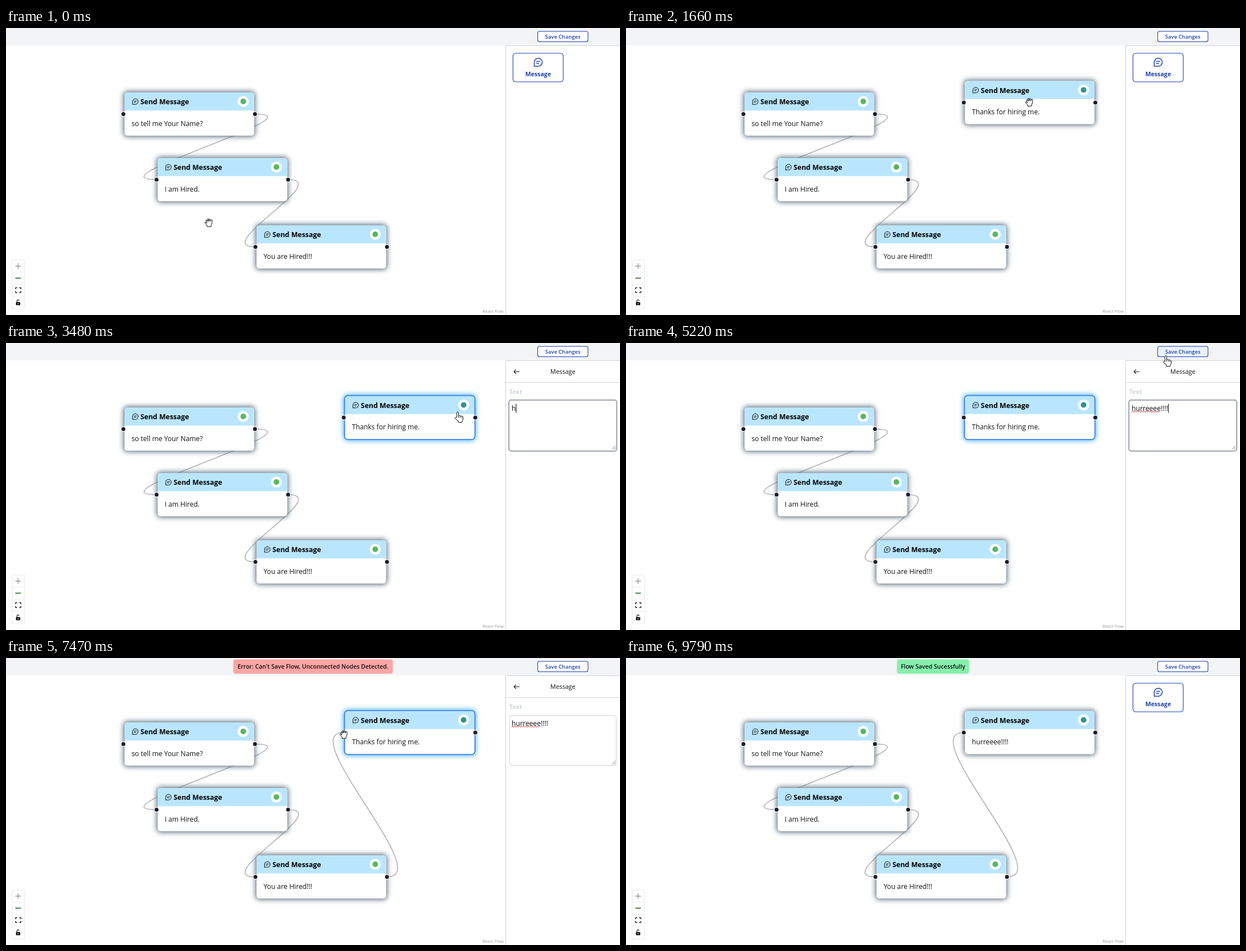
An HTML page for the animation above (9860 ms loop, 1093 by 512 pixels).

```html
<!DOCTYPE html>
<html lang="en">
<head>
<meta charset="utf-8">
<title>Message flow builder</title>
<style>
html, body { margin: 0; width: 100%; height: 100%; overflow: hidden; background: #fff; }
svg { display: block; width: 100%; height: 100%; font-family: "Open Sans", "Noto Sans", sans-serif; }
text { white-space: pre; }
.b { font-weight: 700; }
.s { font-weight: 600; }
.body { font-size: 12.2px; fill: #111; }
.edge { fill: none; stroke: #b1b1b7; stroke-width: 1.6; }
.glow { filter: blur(4.6px); }
.icon { fill: none; stroke: currentColor; stroke-width: 2; stroke-linecap: round; stroke-linejoin: round; }
.hand { fill: #fff; stroke: #111; stroke-width: 1; stroke-linejoin: round; }
</style>
</head>
<body>
<svg id="stage" viewBox="0 0 1093 512"></svg>
<script>
const LOOP = 9860;
const BLUE = '#1e40af';
const FIRST = 'Thanks for hiring me.';
const NEXT = 'hurreeee!!!!';

// Moments at which the interface changes
const T = {
  drag: 1060, drop: 1570, overNode: 1850, select: 2240,
  markFrom: 2790, markTo: 3290, type: 3430, keyGap: 108, spell: 4860,
  save: 5440, error: 5510, link: 6310, snap: 7160, linked: 7390,
  errorEnd: 7510, saveAgain: 8600
};
const PRESSES = [
  [T.drag, T.drop], [2180, 2310], [T.markFrom, T.markTo],
  [5390, 5520], [T.link, T.linked], [8480, 8630]
];

// Pointer path: time, x, y
const PATH = [
  [0, 361, 347], [110, 361, 347], [920, 947, 72], [1100, 947, 72],
  [1540, 718, 132], [1900, 718, 132], [2120, 728, 134], [2320, 728, 134],
  [2740, 1017, 117], [2830, 1017, 117], [3220, 804, 124], [4660, 804, 124],
  [5220, 961, 24], [5380, 984, 15], [5580, 984, 15], [6200, 679, 391],
  [6340, 679, 391], [6660, 711, 337], [7170, 588, 143], [7320, 600, 136],
  [7460, 601, 136], [8220, 988, 14], [8700, 988, 14], [9290, 353, 384],
  [9370, 352, 384], [9750, 212, 526], [LOOP, 212, 526]
];

const NODES = [
  [211, 115, 'so tell me Your Name?'],
  [270, 232, 'I am Hired.'],
  [446, 352, 'You are Hired!!!'],
  [603.3, 94.5, FIRST]
];

const text = (x, y, size, str, extra = '') =>
  `<text x="${x}" y="${y}" font-size="${size}" ${extra}>${str}</text>`;
const rect = (x, y, w, h, fill, extra = '') =>
  `<rect x="${x}" y="${y}" width="${w}" height="${h}" fill="${fill}" ${extra}/>`;
const line = (d, color, width = 1) =>
  `<path d="${d}" fill="none" stroke="${color}" stroke-width="${width}"/>`;
const chatIcon = (x, y, size, color) =>
  `<g class="icon" transform="translate(${x} ${y}) scale(${size / 24})" color="${color}">
    <path d="M2.5 21.5V12A9.5 9.5 0 1 1 12 21.5zM8 10h8M8 14.5h5"/></g>`;

function node([x, y, label], i) {
  const badge = i === 3 ? '#2f9490' : '#55b95c';
  const dot = cx => `<circle cx="${cx}" cy="38.5" r="4.1" fill="#1a192b" stroke="#fff" stroke-width="1.2"/>`;
  return `<g id="node${i}" transform="translate(${x} ${y})">
    ${rect(-2, -2, 234.5, 81, '#60717f', 'rx="7" class="glow"')}
    ${rect(0, 0, 230.7, 77, '#fff', 'rx="5.5"')}
    <path d="M0 32.2V5.5A5.5 5.5 0 0 1 5.5 0H225.2A5.5 5.5 0 0 1 230.7 5.5V32.2z" fill="#bae6fd"/>
    ${rect(-0.7, -0.7, 232.1, 78.4, 'none', 'rx="6" class="ring" stroke="#3478e5" stroke-width="1.6" visibility="hidden"')}
    ${chatIcon(13, 10, 12.5, '#111')}
    ${text(28.3, 21.3, 12.4, 'Send Message', 'class="b"')}
    <circle cx="211.3" cy="16" r="9.8" fill="#fff"/>
    <circle cx="211.3" cy="16" r="5" fill="${badge}"/>
    <text class="body label" x="12.4" y="59.5">${label}</text>
    ${dot(-2)}${dot(232.2)}
  </g>`;
}

// Bezier that loops outward when the end lies behind the start
function curve(x1, y1, x2, y2) {
  const d = x2 - x1;
  const c = d >= 0 ? d / 2 : Math.min(11 * Math.sqrt(-d), 62 - 0.34 * d);
  return `M${x1} ${y1}C${x1 + c} ${y1} ${x2 - c} ${y2} ${x2} ${y2}`;
}
const port = (i, out) => [NODES[i][0] + (out ? 232.2 : -2), NODES[i][1] + 38.5];
const edge = (a, b, id) =>
  `<path id="${id}" class="edge" d="${curve(...port(a, true), ...port(b, false))}"/>`;

const tile = `${rect(902.5, 45, 89.5, 51, '#fff', `rx="5" class="tile" stroke="${BLUE}" stroke-width="1.1"`)}
  ${chatIcon(938.5, 52, 18, BLUE)}
  ${text(947.3, 86, 10.7, 'Message', `class="b" text-anchor="middle" fill="${BLUE}"`)}`;

const controls = `${rect(11, 414, 22, 87, '#fff', 'stroke="#e9e9ea"')}
  ${line('M11 435.5h22M11 457h22M11 478.5h22', '#eee')}
  ${line('M16.5 424.7h10M21.5 419.7v10', '#9a9a9a', 1.4)}
  ${line('M16.5 446.3h10', '#1c6b25', 1.6)}
  ${line('M17 466v-2.6h3M23.500 463.400h3v2.600M26.500 469.300v2.600h-3M20 471.900h-3v-2.600', '#111', 1.3)}
  ${rect(17.7, 489, 7.6, 5.6, '#111', 'rx=".8"')}
  ${line('M19.5 489v-1.700a2 2 0 0 1 4-.6', '#111', 1.2)}
  <circle cx="21.5" cy="491.7" r=".9" fill="#fff"/>`;

const zigzag = 'M900 123.500' + Array.from({ length: 25 }, (_, i) => `l2 ${i % 2 ? 2 : -2}`).join('');

const panel = `${line('M889 70.500H1093', '#cfd2d6')}
  ${line('M914 51.200H904.300M908 47.400L904.200 51.200L908 55', '#111', 1.1)}
  ${text(991.3, 55, 10.9, 'Message', 'text-anchor="middle" fill="#111"')}
  ${text(895.7, 91, 11, 'Text', 'class="b" fill="#d1d5db"')}
  <rect id="box" fill="#fff"/>
  ${line('M1079 189.500l6-6M1082.500 189.500l2.500-2.500', '#666', 0.9)}
  <rect id="mark" y="109" height="16" fill="#2f73d9"/>
  <text class="body" x="900" y="121"><tspan id="head"></tspan><tspan id="tail" fill="#fff"></tspan></text>
  <g id="spell">${line(zigzag, '#e02b2b')}</g>
  <rect id="caret" y="108.500" width="1.100" height="16" fill="#111"/>`;

const toast = (id, x, w, fill, str) => `<g id="${id}">${rect(x, 2.5, w, 25.5, fill, 'rx="4"')}
  ${text(x + w / 2, 19.3, 10.5, str, 'class="s" text-anchor="middle" fill="#111"')}</g>`;

const cursors = `<g id="pointer">
  <circle id="press" r="9" fill="#f4e72f" opacity=".82"/>
  <g id="grab" class="hand"><path d="M-3.500 1.500L-5-3Q-5-4.500-3.400-4.200L-2-1.500L-2.600-5.400Q-2.400-7-.7-6.400L0-2L.6-5.900Q1.600-7.100 2.600-5.800V-2L4-4.700Q5.400-5.500 6-4.100L5.500 2L4 5V7.300H-3V5L-6.800 1Q-7.100-.5-5.700-.4z"/></g>
  <g id="point" class="hand"><path d="M-1.500 9V.5a1.500 1.500 0 0 1 3 0V6l1-.6 2 .6 1-.2 2 .8 1-.2 1 1V12l-1.500 3v2.500h-7V15L-4.600 10.500Q-5 8.600-3.500 8.500zM1.500 6v3M4.500 6.500V9.500M7.300 7v2.500"/></g>
  <g id="arrow" class="hand"><path d="M0 0V14L3.300 11L5.500 16L7.600 15L5.400 10.200H9.800z"/></g>
  <g id="beam">${line('M-2.500-7H2.500M0-7V7M-2.500 7H2.500', '#111', 1.1)}</g>
</g>`;

const stage = document.getElementById('stage');
stage.innerHTML = `
  ${rect(0, 0, 1093, 512, '#fff')}
  ${edge(0, 1, 'e1')}${edge(1, 2, 'e2')}${edge(2, 3, 'e3')}
  ${NODES.map(node).join('')}
  <path id="wire" class="edge"/>
  ${controls}
  ${text(848.3, 508, 7.6, 'React Flow', 'fill="#93999a"')}
  ${rect(889, 31, 204, 481, '#fff')}
  ${rect(0, 0, 1093, 31, '#f3f4f6')}
  ${line('M889.400 512V31.500H1093', '#cfd2d6')}
  <g id="tiles">${tile}</g>
  <g id="panel">${panel}</g>
  ${rect(946.5, 6, 89.5, 18.5, '#fff', `id="save" rx="3" stroke="${BLUE}" stroke-width="1.100"`)}
  ${text(991.2, 19, 9.5, 'Save Changes', `class="s" text-anchor="middle" fill="${BLUE}"`)}
  ${toast('error', 404.5, 284, '#fca5a5', "Error: Can't Save Flow, Unconnected Nodes Detected.")}
  ${toast('done', 482.3, 128.4, '#86efac', 'Flow Saved Sucessfully')}
  <g id="ghost" opacity=".65">${tile}</g>
  ${cursors}`;

const el = Object.fromEntries([...stage.querySelectorAll('[id]')].map(e => [e.id, e]));
const last = el.node3;
const ring = last.querySelector('.ring');
const glow = last.querySelector('.glow');
const label = last.querySelector('.label');
const tileBox = el.tiles.querySelector('.tile');

const show = (e, on) => { e.style.display = on ? '' : 'none'; };
const set = (e, attrs) => { for (const k in attrs) e.setAttribute(k, attrs[k]); };
const within = (t, a, b) => t >= a && t < b;
const inside = (x, y, l, t, w, h) => x >= l && x <= l + w && y >= t && y <= t + h;

function pointerAt(t) {
  const i = Math.max(1, PATH.findIndex(p => p[0] > t));
  const [t0, x0, y0] = PATH[i - 1], [t1, x1, y1] = PATH[i];
  const u = (t - t0) / (t1 - t0);
  const k = u * u * (3 - 2 * u);
  return [x0 + (x1 - x0) * k, y0 + (y1 - y0) * k];
}

function cursorKind(t, x, y, open) {
  if (within(t, T.drag, T.drop)) return 'arrow';
  if (within(t, T.markFrom, T.markTo)) return 'beam';
  if (within(t, T.link, T.linked)) return 'grab';
  if (inside(x, y, 946, 5, 90, 20)) return 'point';
  if (!open && inside(x, y, 902, 45, 90, 51)) return 'point';
  if (open && inside(x, y, 896, 102, 190, 90)) return 'beam';
  if (x > 889 || y < 31) return 'arrow';
  const onNode = NODES.some(([nx, ny], i) => (i < 3 || t > T.overNode) && inside(x, y, nx, ny, 231, 77));
  return onNode ? 'point' : 'grab';
}

function drawField(t, x) {
  const focus = within(t, T.markFrom, T.save);
  set(el.box, focus
    ? { x: 895.2, y: 101.7, width: 192, height: 91, rx: 4, stroke: '#9ca3af', 'stroke-width': 2 }
    : { x: 896.2, y: 102.7, width: 190, height: 89, rx: 4, stroke: '#cdd0d5', 'stroke-width': 1 });
  const typed = t >= T.type;
  const count = Math.floor((t - T.type) / T.keyGap) + 1;
  const value = typed ? NEXT.slice(0, count) : FIRST;
  const cut = focus && !typed
    ? Math.round(Math.min(1, Math.max(0, (x - 900) / 119)) * FIRST.length)
    : value.length;
  el.head.textContent = value.slice(0, cut);
  el.tail.textContent = value.slice(cut);
  const headEnd = 900 + (cut ? el.head.getComputedTextLength() : 0);
  const marked = cut < value.length;
  show(el.mark, marked);
  if (marked) set(el.mark, { x: headEnd, width: el.tail.getComputedTextLength() });
  show(el.caret, focus && !marked);
  set(el.caret, { x: headEnd });
  show(el.spell, t >= T.spell);
}

function draw(t) {
  const [x, y] = pointerAt(t);
  const open = within(t, T.select, T.saveAgain);
  const saved = t >= T.saveAgain;

  show(last, t >= T.drop);
  set(ring, { visibility: open ? 'visible' : 'hidden' });
  set(glow, { fill: open ? '#2ba6ee' : '#60717f' });
  label.textContent = saved ? NEXT : FIRST;

  show(el.e3, t >= T.linked);
  const wiring = within(t, T.link + 30, T.linked);
  show(el.wire, wiring);
  if (wiring) {
    const end = t >= T.snap ? port(3, false) : [x - 1, Math.min(y + 8, 391)];
    set(el.wire, { d: curve(...port(2, true), ...end) });
  }

  show(el.tiles, !open);
  show(el.panel, open);
  if (open) drawField(t, x);
  set(tileBox, { fill: t < T.drag && inside(x, y, 902, 45, 90, 51) ? '#eff6ff' : '#fff' });
  set(el.save, { fill: inside(x, y, 946, 5, 90, 20) ? '#eaf2ff' : '#fff' });
  show(el.error, within(t, T.error, T.errorEnd));
  show(el.done, saved);

  show(el.ghost, within(t, T.drag + 40, T.drop));
  set(el.ghost, { transform: `translate(${x - 947} ${y - 72})` });

  set(el.pointer, { transform: `translate(${x} ${y})` });
  const kind = cursorKind(t, x, y, open);
  for (const k of ['grab', 'point', 'arrow', 'beam']) show(el[k], k === kind);
  show(el.press, PRESSES.some(([a, b]) => within(t, a, b)));
}

const start = performance.now();
function tick() {
  draw((performance.now() - start) % LOOP);
  requestAnimationFrame(tick);
}
tick();
</script>
</body>
</html>
```
